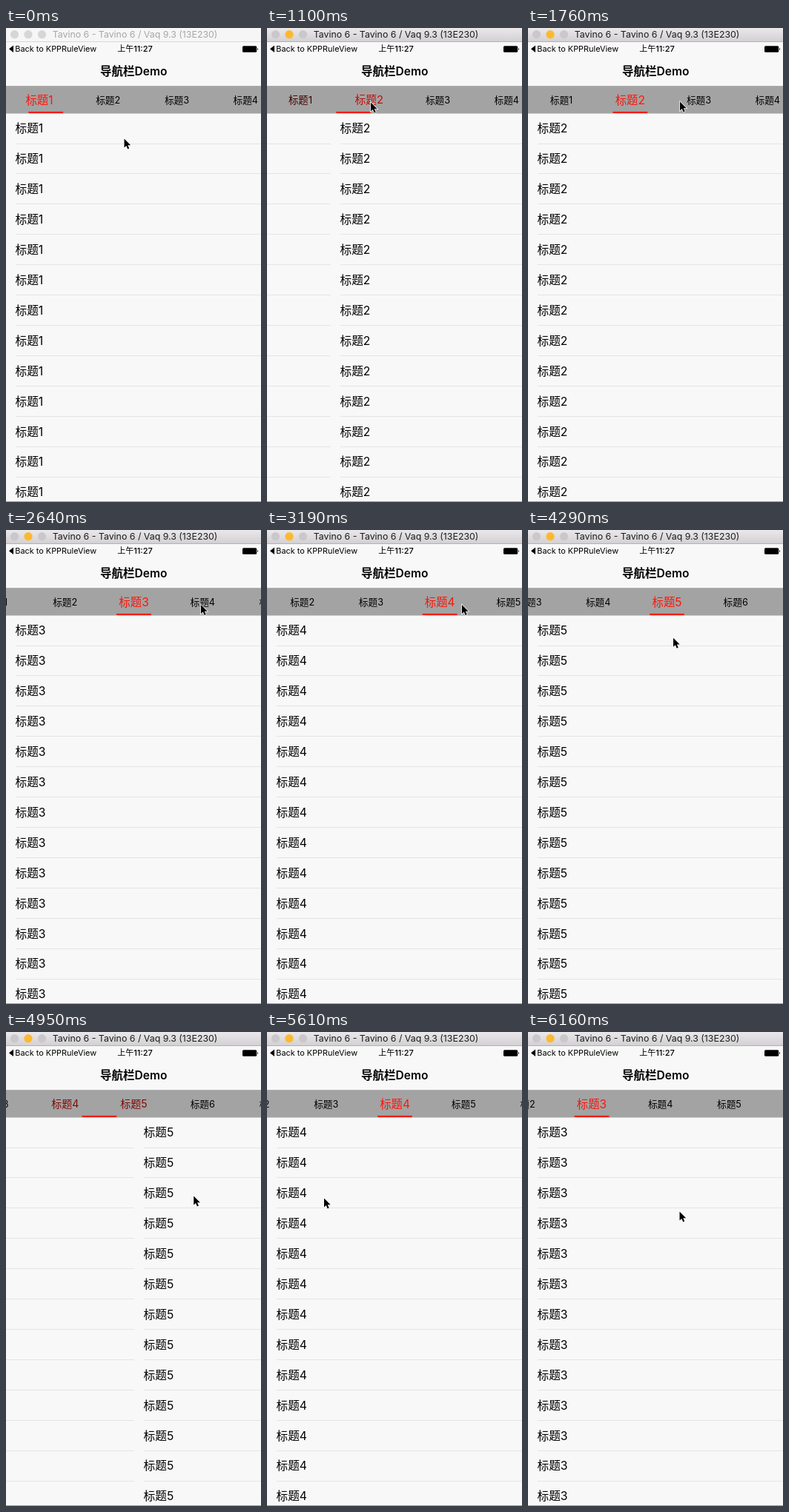
These frames come from a looping animation (344 px wide and 640 px high, 6270 ms). An HTML page:

```html
<!DOCTYPE html>
<html lang="zh-CN">
<head>
<meta charset="utf-8">
<title>导航栏Demo</title>
<style>
  html, body { margin: 0; width: 100%; height: 100%; overflow: hidden; background: #f8f8f8; }
  svg { display: block; width: 344px; height: 640px; }
  text { font-family: Inter, "Noto Sans CJK SC", "Noto Sans CJK", sans-serif; }
</style>
</head>
<body>
<svg id="stage" viewBox="0 0 344 640" xmlns="http://www.w3.org/2000/svg">
  <defs>
    <linearGradient id="chrome" x2="0" y2="1">
      <stop stop-color="#eae8ea"/><stop offset="1" stop-color="#d2d0d2"/>
    </linearGradient>
  </defs>
  <rect width="344" height="640" fill="#f8f8f8"/>
  <g id="pages"></g>
  <rect y="78" width="344" height="37.5" fill="#a3a3a3"/>
  <path d="M0 78.5H344" stroke="#b0b0b0"/>
  <g id="tabs"></g>
  <rect id="underline" y="112.9" width="46.8" height="2" fill="#fb1509"/>

  <rect id="bar" width="344" height="18.5"/>
  <path id="barEdge" d="M0 18.5H344"/>
  <circle class="dot" cx="11.5" cy="8.7" r="5.6"/>
  <circle id="yellow" cx="30" cy="8.7" r="5.6"/>
  <circle class="dot" cx="48.5" cy="8.7" r="5.6"/>
  <text id="caption" x="174" y="13.4" font-size="12.35" text-anchor="middle">Tavino 6 - Tavino 6 / Vaq 9.3 (13E230)</text>

  <path d="M4 28.3L10 23.6V33Z"/>
  <text x="12.3" y="32.3" font-size="10.9">Back to KPPRuleView</text>
  <text x="174" y="32.4" font-size="11" font-weight="500" text-anchor="middle">上午11:27</text>
  <rect x="319" y="24.2" width="19.2" height="8.6" rx="1.5"/>
  <path d="M339 27Q341 28.5 339 30Z"/>
  <text x="172.2" y="64" font-size="15.5" font-weight="600" text-anchor="middle">导航栏Demo</text>

  <path d="M0 639.5H344" stroke="#999"/>
  <path id="cursor" d="M0 .4V12.6L2.8 10 4.7 14.4 6.7 13.5 4.8 9.2H8.7Z" stroke="#fff" stroke-width="1.4" paint-order="stroke"/>
</svg>
<script>
const LOOP = 6270, STEP = 110, WIDTH = 344;
const TABS = 8, PITCH = 92.75, FIRST = 45, ROWS = 13, ROW_H = 40.92;
const $ = id => document.getElementById(id);

function add(parent, tag, attrs, text = '') {
  const el = document.createElementNS('http://www.w3.org/2000/svg', tag);
  for (const k in attrs) el.setAttribute(k, attrs[k]);
  el.textContent = text;
  return parent.appendChild(el);
}

const ease = {
  both: u => (1 - Math.cos(Math.PI * u)) / 2,
  out: u => 1 - (1 - u) ** 3,
  linear: u => u
};

// Each key is [time, value, easing towards this key].
function sample(keys, t) {
  if (t <= keys[0][0]) return keys[0][1];
  for (let i = 1; i < keys.length; i++) {
    const [t0, a] = keys[i - 1], [t1, b, kind = 'both'] = keys[i];
    if (t < t1) return a + (b - a) * ease[kind]((t - t0) / (t1 - t0));
  }
  return keys[keys.length - 1][1];
}

// Bar offset that centres a tab
const centred = n => FIRST + PITCH * (n - 1) - 172.5;

const pageKeys = [
  [900, 1], [1200, 2], [2000, 2], [2300, 3], [2770, 3], [3070, 4], [3769, 4], [4069, 5],
  [4690, 5], [4950, 4.497, 'linear'], [5240, 4, 'out'],
  [5680, 4], [5880, 3.63, 'linear'], [6110, 3, 'out']
];
const scrollKeys = [
  [2300, 0], [2600, centred(3)], [3070, centred(3)], [3370, centred(4)],
  [4069, centred(4)], [4369, centred(5)], [5240, centred(5)], [5540, centred(4)],
  [6110, centred(4)], [6410, centred(3)]
];
const cursorPath = [
  [110, 159.5, 149], [660, 140, 100], [1320, 140, 100], [1760, 205, 99], [1900, 222, 100],
  [2150, 222, 100], [2600, 263, 100.5], [4070, 263, 100.5], [4600, 81, 222], [4690, 81, 222],
  [4950, 253.2, 221, 'linear'], [5060, 253.2, 221], [5600, 77, 224], [5680, 77, 224],
  [5880, 204, 240, 'linear'], [6100, 204.5, 242]
];
const cursorX = cursorPath.map(([t, x, , e]) => [t, x, e]);
const cursorY = cursorPath.map(([t, , y, e]) => [t, y, e]);

const pages = [], tabs = [];
for (let n = 1; n <= TABS; n++) {
  const page = add($('pages'), 'g', {});
  for (let r = 0; r < ROWS; r++) {
    const y = r * ROW_H;
    add(page, 'text', { x: 12.5, y: 141.3 + y, 'font-size': 15.7 }, '标题' + n);
    add(page, 'path', { d: `M13 ${Math.floor(156 + y) + .5}H${WIDTH}`, stroke: '#e4e4e4' });
  }
  pages.push(page);
  tabs.push(add($('tabs'), 'text', { 'text-anchor': 'middle' }, '标题' + n));
}

function draw(time) {
  const t = Math.floor(time % LOOP / STEP) * STEP;
  const page = sample(pageKeys, t), scroll = sample(scrollKeys, t), active = t >= 880;

  pages.forEach((g, i) => {
    const x = (i + 1 - page) * WIDTH;
    g.setAttribute('transform', `translate(${x} 0)`);
    g.setAttribute('display', Math.abs(x) < WIDTH ? 'inline' : 'none');
  });
  tabs.forEach((tab, i) => {
    const w = Math.max(0, 1 - Math.abs(i + 1 - page)), size = 12.7 + 2.7 * w;
    tab.setAttribute('x', FIRST + PITCH * i - scroll);
    tab.setAttribute('y', 97 + .37 * size);
    tab.setAttribute('font-size', size);
    tab.setAttribute('fill', `rgb(${255 * w},${20 * w},${10 * w})`);
  });
  // The marker starts off-centre under the first tab.
  const shift = 8.7 * Math.max(0, 2 - page);
  $('underline').setAttribute('x', FIRST + PITCH * (page - 1) - scroll + shift - 23.4);

  $('bar').setAttribute('fill', active ? 'url(#chrome)' : '#f6f6f6');
  $('barEdge').setAttribute('stroke', active ? '#b4b2b4' : '#d8d8d8');
  $('caption').setAttribute('fill', active ? '#1c1c1c' : '#a6a6a6');
  $('yellow').setAttribute('fill', active ? '#fdb92e' : '#d6d6d6');
  document.querySelectorAll('.dot').forEach(d => d.setAttribute('fill', active ? '#cac8ca' : '#d6d6d6'));

  $('cursor').setAttribute('transform', `translate(${sample(cursorX, t)} ${sample(cursorY, t)})`);
}

const start = performance.now();
function tick() {
  draw(performance.now() - start);
  requestAnimationFrame(tick);
}
tick();
</script>
</body>
</html>
```
